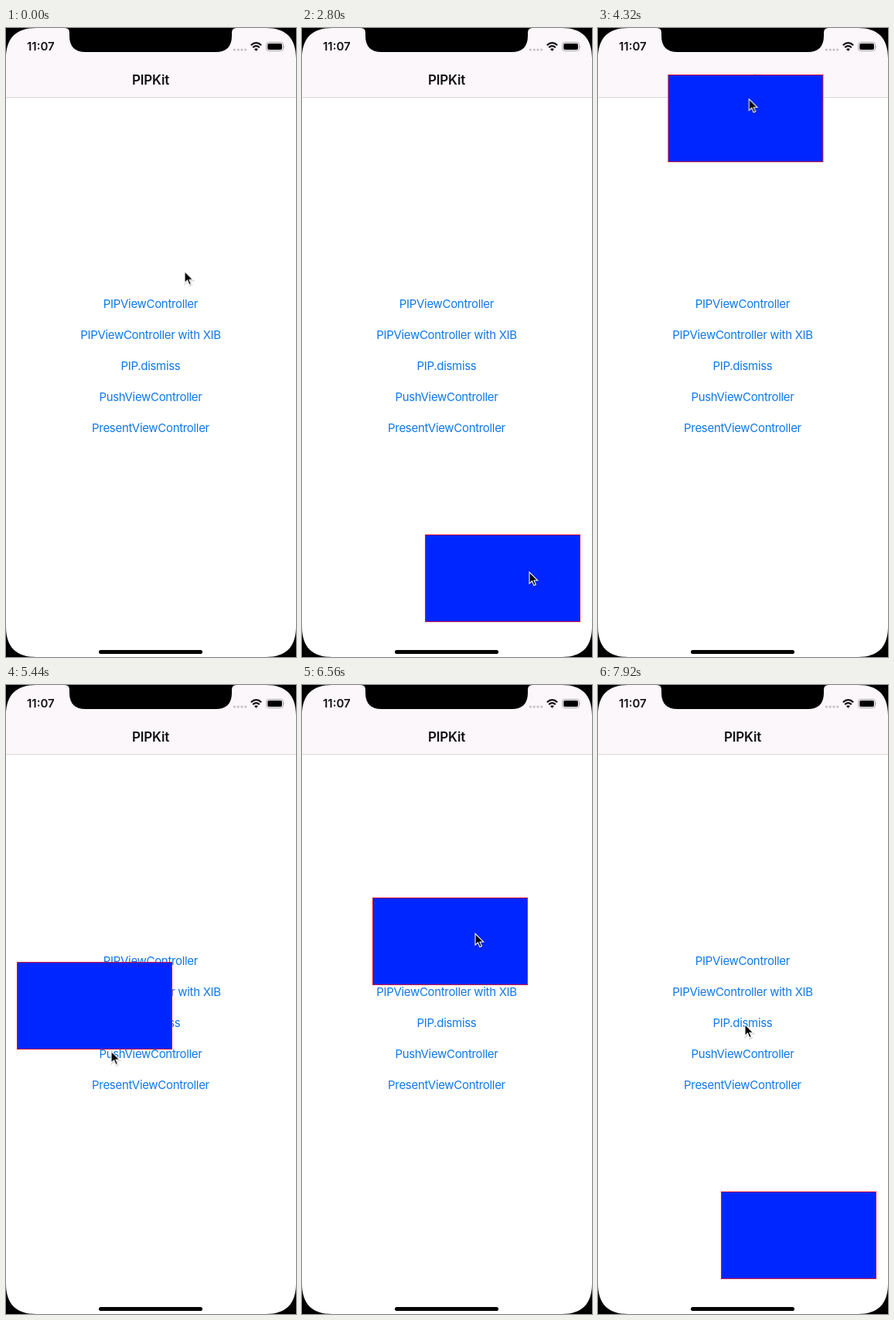
An HTML page that plays this animation: 375 by 811 pixels, repeating every 8000 ms.

```html
<!DOCTYPE html>
<html lang="en">
<head>
<meta charset="utf-8">
<title>PIPKit</title>
<style>
html, body { margin: 0; width: 100%; height: 100%; overflow: hidden; background: #fff; }
svg { display: block; width: 100vw; height: 100vh; }
text { font-family: Inter, Roboto, sans-serif; }
.bar { font-weight: 600; fill: #111; }
.links { font-size: 15px; letter-spacing: -.32px; fill: #0f78ea; text-anchor: middle; }
#tapped { animation: tap 8s linear infinite; }
#pip { animation: pip 8s linear infinite, show 8s linear infinite; }
#cursor { animation: cursor 8s linear infinite; }

@keyframes tap {
  0%, 25% { opacity: 1; }
  25.5%, 26.5% { opacity: .25; }
  29%, 100% { opacity: 1; }
}
@keyframes show {
  0%, 27% { opacity: 0; }
  30%, 100% { opacity: 1; }
}
/* Dragged with the pointer, then eased to the nearest docking place. */
@keyframes pip {
  0% { transform: translate(159px, 653px); }
  36% { transform: translate(159px, 653px); animation-timing-function: ease-in-out; }
  41%, 41.5% { transform: translate(144px, 314px); animation-timing-function: ease-out; }
  43.5% { transform: translate(159px, 357px); }
  47% { transform: translate(159px, 357px); }
  52% { transform: translate(150px, 60px); }
  53% { transform: translate(128px, 60px); }
  54% { transform: translate(91px, 60px); }
  55% { transform: translate(40px, 60px); }
  56% { transform: translate(14px, 60px); }
  59% { transform: translate(14px, 60px); animation-timing-function: ease-in-out; }
  64% { transform: translate(40px, 366px); animation-timing-function: ease-out; }
  66% { transform: translate(14px, 357px); }
  70% { transform: translate(14px, 357px); animation-timing-function: ease-in-out; }
  74% { transform: translate(38px, 653px); }
  75%, 75.5% { transform: translate(14px, 653px); }
  77% { transform: translate(30px, 600px); }
  82% { transform: translate(91px, 274px); }
  83% { transform: translate(94px, 273px); animation-timing-function: ease-out; }
  85% { transform: translate(159px, 357px); }
  89% { transform: translate(159px, 357px); animation-timing-function: ease-in-out; }
  94% { transform: translate(128px, 653px); animation-timing-function: ease-out; }
  96%, 100% { transform: translate(159px, 653px); }
}
@keyframes cursor {
  0% { transform: translate(230px, 312px); }
  4% { transform: translate(243px, 400px); }
  7% { transform: translate(241px, 498px); }
  11% { transform: translate(232px, 461px); }
  15% { transform: translate(210px, 350px); }
  22% { transform: translate(201px, 341px); }
  25%, 28% { transform: translate(210px, 350px); animation-timing-function: ease-in-out; }
  34%, 36% { transform: translate(293px, 700px); animation-timing-function: ease-in-out; }
  41%, 43.5% { transform: translate(278px, 361px); }
  47% { transform: translate(263px, 405px); }
  52% { transform: translate(254px, 104px); }
  53% { transform: translate(232px, 96px); }
  54% { transform: translate(195px, 90px); }
  55% { transform: translate(145px, 91px); }
  56% { transform: translate(116px, 92px); }
  59% { transform: translate(126px, 155px); animation-timing-function: ease-in-out; }
  64% { transform: translate(152px, 461px); }
  66% { transform: translate(140px, 462px); }
  68% { transform: translate(135px, 471px); }
  70% { transform: translate(146px, 430px); animation-timing-function: ease-in-out; }
  74% { transform: translate(170px, 726px); }
  75%, 75.5% { transform: translate(146px, 698px); }
  77% { transform: translate(162px, 645px); }
  82% { transform: translate(223px, 319px); }
  83% { transform: translate(226px, 318px); }
  85% { transform: translate(232px, 330px); }
  89% { transform: translate(270px, 410px); animation-timing-function: ease-in-out; }
  94% { transform: translate(239px, 760px); animation-timing-function: ease-in-out; }
  98.5%, 100% { transform: translate(189px, 436px); }
}
</style>
</head>
<body>
<svg viewBox="0 0 375 811" preserveAspectRatio="none">
  <rect width="375" height="811" fill="#fff"/>
  <rect width="375" height="89" fill="#fcf7fb"/>
  <rect y="89" width="375" height="1" fill="#dcd9dc"/>
  <text class="bar" x="187" y="73" font-size="17" letter-spacing="-.2" text-anchor="middle">PIPKit</text>

  <g class="links">
    <text id="tapped" x="187" y="360.5">PIPViewController</text>
    <text x="187" y="400.5">PIPViewController with XIB</text>
    <text x="187" y="440.5">PIP.dismiss</text>
    <text x="187" y="480.5">PushViewController</text>
    <text x="187" y="520.5">PresentViewController</text>
  </g>

  <g id="pip">
    <rect x=".5" y=".5" width="200" height="112" fill="#0026ff" stroke="#d8143c"/>
  </g>

  <!-- status bar -->
  <text class="bar" x="27" y="29.3" font-size="15">11:07</text>
  <g fill="#c4c0c4">
    <circle cx="295.5" cy="28" r="1.6"/><circle cx="300.3" cy="28" r="1.6"/>
    <circle cx="305" cy="28" r="1.6"/><circle cx="309.7" cy="28" r="1.6"/>
  </g>
  <g fill="none" stroke="#111" stroke-width="2.1">
    <path d="M316.8 22.3Q323.500 16.100 330.200 22.300"/>
    <path d="M319.200 25.100Q323.500 21.200 327.800 25.100"/>
  </g>
  <path d="M321 27.200Q323.500 25.200 326 27.200L323.500 29.800Z" fill="#111"/>
  <rect x="336.700" y="18.500" width="21.800" height="11" rx="3" fill="none" stroke="#a5a1a5"/>
  <rect x="338.300" y="20.100" width="18.600" height="7.800" rx="1.700" fill="#000"/>
  <path d="M359.500 22.200Q361 24 359.500 25.800Z" fill="#a5a1a5"/>

  <!-- device edge -->
  <path fill-rule="evenodd" d="M0 0H375V811H0ZM39 0H76Q82 0 82 6V10Q82 31 103 31H271Q292 31 292 10V6Q292 0 298 0H336C362 0 375 13 375 39V772C375 798 362 811 336 811H39C13 811 0 798 0 772V39C0 13 13 0 39 0Z"/>
  <rect x="120" y="802" width="134" height="5" rx="2.500"/>

  <g id="cursor">
    <path d="M1.500 3V17.500L5 14.300L7.500 20L10 18.900L7.600 13.400H12.300Z" fill="#000" opacity=".15" stroke="#000" stroke-width="2"/>
    <path d="M1 1.500V16.300L4.500 13L6.900 18.700L9.400 17.600L7 12.200H11.600Z" fill="#000" stroke="#fff" stroke-width="1.100"/>
  </g>
</svg>
</body>
</html>
```
